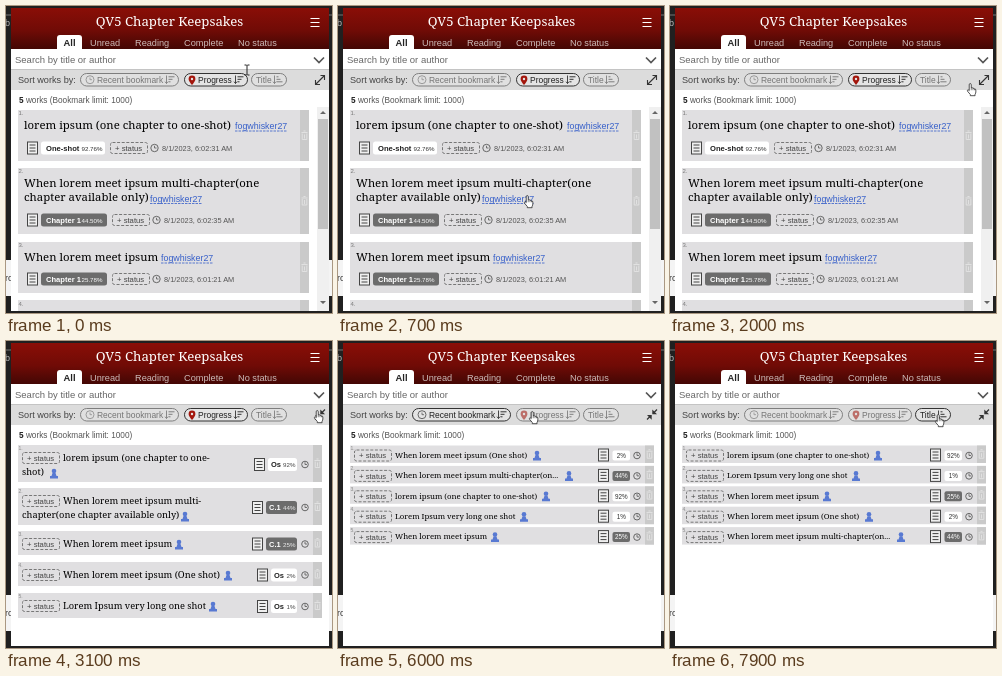
An HTML page that plays this animation: 326 by 307 pixels, repeating every 8 s.

```html
<!DOCTYPE html>
<html lang="en">
<head>
<meta charset="utf-8">
<title>Bookmark list</title>
<style>
  html, body { margin: 0; width: 100%; height: 100%; overflow: hidden; background: #222; }
  svg { display: block; width: 326px; height: 307px; }
  text { font-family: "Liberation Sans", Arial, sans-serif; white-space: pre; }
  .serif { font-family: "Noto Serif", Georgia, serif; }
  .b { font-weight: bold; }
  .head { font-weight: 500; }
  .sort { opacity: .55; }
  .sort.on { opacity: 1; }
  .bg { fill: #e0dfe1; }
  .side { fill: #cacaca; }
  .shade { opacity: 0; }
  .over .bg { fill: #c6c5c7; }
  .over .side { fill: #b5b5b5; }
  .over .shade { opacity: .6; }
</style>
</head>
<body>
<svg id="stage" viewBox="0 0 326 307" xmlns="http://www.w3.org/2000/svg"></svg>
<script>
const LOOP = 8000, STEP = 100;

// ---- drawing helpers ----
const rect = (x, y, w, h, fill, more = '') =>
  `<rect x="${x}" y="${y}" width="${w}" height="${h}" fill="${fill}" ${more}/>`;
const text = (x, y, size, str, fill = '#222', cls = '', more = '') =>
  `<text x="${x}" y="${y}" font-size="${size}" fill="${fill}" class="${cls}" ${more}>${str}</text>`;
const line = (d, color, w = 1, more = '') =>
  `<path d="${d}" fill="none" stroke="${color}" stroke-width="${w}" ${more}/>`;
const group = (body, more = '') => `<g ${more}>${body}</g>`;

const doc = (x, cy) =>
  rect(x + .5, cy - 6, 10, 12, '#efefef', 'stroke="#444"') +
  line(`M${x + 2.5} ${cy - 3}h6m-6 3h6m-6 3h6`, '#444', 1);
const clock = (x, y, r = 3.7) =>
  `<circle cx="${x}" cy="${y}" r="${r}" fill="none" stroke="#666"/>` +
  line(`M${x} ${y - 2.2}V${y}h2`, '#666', .9);
const person = (x, y) =>
  `<path d="M${x - 4} ${y + 5.5}v-2.5h1.5l1-3h3l1 3h1.5v2.5z" fill="#5879d2"/>` +
  `<circle cx="${x}" cy="${y - 2}" r="2.3" fill="#5879d2"/>`;
const status = (x, cy) =>
  rect(x + .5, cy - 5.5, 37, 11, 'none', 'rx="2" stroke="#777" stroke-dasharray="3 1.6"') +
  text(x + 5, cy + 2.7, 7.7, '+ status', '#444');
const pill = (x, cy, w, gray) =>
  rect(x, cy - 6.5, w, 13, gray ? '#6c6c6c' : '#fff', 'rx="2.5"');
const trash = (x, y) =>
  line(`M${x - 3} ${y - 3}h6M${x - 1} ${y - 4.5}h2M${x - 2.3} ${y - 2}v6h4.6v-6M${x} ${y - 1}v4`, '#e4e4e4', .9);
const side = (x, y, h) => rect(x, y, 9, h, '#cacaca', 'class="side"') + trash(x + 4.5, y + h / 2);
const base = (w, y, h) => rect(12, y, w, h, '#e0dfe1', 'class="bg"') + side(3 + w, y, h);

// ---- data ----
const works = {
  A: { title: 'lorem ipsum (one chapter to one-shot)', tag: 'Os', pct: 92, end: 208 },
  B: { title: 'When lorem meet ipsum multi-chapter(on...', tag: 'C.1', pct: 44, end: 231, gray: true },
  C: { title: 'When lorem meet ipsum', tag: 'C.1', pct: 25, end: 157, gray: true },
  D: { title: 'When lorem meet ipsum (One shot)', tag: 'Os', pct: 2, end: 199 },
  E: { title: 'Lorem Ipsum very long one shot', tag: 'Os', pct: 1, end: 186 }
};
const orders = { progress: 'ABCDE', recent: 'DBAEC', title: 'AECDB' };

// y, height, title lines, link x, tag, percent, time of day
const cards = [
  [104, 51, ['lorem ipsum (one chapter to one-shot)'], 229, 'One-shot', '92.76%', '6:02:31'],
  [162, 66, ['When lorem meet ipsum multi-chapter(one', 'chapter available only)'], 144, 'Chapter 1', '44.50%', '6:02:35'],
  [236, 51, ['When lorem meet ipsum'], 155, 'Chapter 1', '25.78%', '6:01:21']
];

// y, height, title lines, icon x, icon y, work key
const midRows = [
  [104, 37, ['lorem ipsum (one chapter to one-', 'shot)'], 48, 132, 'A'],
  [147, 37, ['When lorem meet ipsum multi-', 'chapter(one chapter available only)'], 179, 175, 'B'],
  [190, 24, ['When lorem meet ipsum'], 173, 203, 'C'],
  [221, 24, ['When lorem meet ipsum (One shot)'], 222, 234, 'D'],
  [252, 25, ['Lorem Ipsum very long one shot'], 207, 265, 'E']
];

// ---- views ----
function card([y, h, lines, linkX, tag, pct, time], i) {
  const gray = i > 0, dx = gray ? 2 : 0, cy = y + h - (gray ? 14 : 13);
  const last = y + 19 + 14.5 * (lines.length - 1);
  return group(
    rect(12, y, 292.5, h + 1.5, '#666', 'class="shade"') + base(291, y, h) +
    text(12.5, y + 5, 6, `${i + 1}.`, '#777') +
    lines.map((s, n) => text(18, y + 18.5 + 14.5 * n, 11.37, s, '#000', 'serif')).join('') +
    text(linkX, last, 8.9, 'fogwhisker27', '#365fc9') +
    line(`M${linkX} ${last + 2}h52`, '#365fc9', .8, 'stroke-dasharray="2.5 1"') +
    doc(21, cy) + pill(35, cy, 64 + dx, gray) +
    text(40, cy + 2.8, 7.6, tag, gray ? '#fff' : '#222', 'b') +
    text(75.5, cy + 2.6, 6.2, pct, gray ? '#fff' : '#333') +
    status(104 + dx, cy) + clock(148.5 + dx, cy) +
    text(156 + dx, cy + 3, 7.4, `8/1/2023, ${time} AM`, '#555'),
    `class="card" data-top="${y}" data-end="${y + h}"`);
}

const fullView = cards.map(card).join('') +
  rect(12, 294, 291, 11, '#e0dfe1') + rect(294, 294, 9, 11, '#cacaca') +
  text(12.5, 300, 6, '4.', '#777') +
  rect(311, 101, 12, 204, '#f0f0f0') + rect(312, 113, 10, 110, '#c1c1c1') +
  '<path d="M314 108l3-3 3 3zM314 295l3 3 3-3z" fill="#666"/>';

const midView = midRows.map(([y, h, lines, px, py, key], i) => {
  const w = works[key], cy = y + h / 2 + 1, foot = y + 16;
  const left = w.gray ? 260 : w.pct > 9 ? 262 : 265;
  return base(304, y, h) +
    text(12.5, y + 5, 5, `${i + 1}.`, '#888') + status(16, foot - 3) +
    lines.map((s, n) => text(n ? 16 : 57, foot + 14 * n, 9.25, s, '#000', 'serif')).join('') +
    person(px, py) + doc(left - 14, cy) + pill(left, cy, 291 - left, w.gray) +
    text(left + 3, cy + 2.8, 7.5, w.tag, w.gray ? '#fff' : '#222', 'b') +
    text(289.5, cy + 2.5, 6.2, w.pct + '%', w.gray ? '#eee' : '#444', '', 'text-anchor="end"') +
    clock(299, cy, 3.3);
}).join('');

const tightView = order => [...order].map((key, i) => {
  const w = works[key], y = 104.5 + 20.4 * i, cy = y + 10;
  return base(304, y, 17.5) +
    text(12.5, y + 4.5, 5, `${i + 1}.`, '#888') + status(16, cy) +
    text(57, y + 12.3, 7.8, w.title, '#000', 'serif') + person(w.end, y + 9.5) +
    doc(260, cy - .5) + rect(274.5, cy - 5, 17.5, 10, w.gray ? '#6c6c6c' : '#fff', 'rx="2"') +
    text(283.3, cy + 2.3, 6.3, w.pct + '%', w.gray ? '#fff' : '#333', '', 'text-anchor="middle"') +
    clock(299, cy, 3.3);
}).join('');

const view = (name, body) => group(body, `data-view="${name}"`);

// ---- frame around the lists ----
const bars = (x, up) => [2, 4, 6].map((n, i) =>
  line(`M${x + 3.5} ${70.8 + 2.5 * i}h${up ? n : 8 - n}`, '#333', 1)).join('') +
  line(`M${x + 1.5} 69.5v8m-1.5-1.8l1.5 1.8 1.5-1.8`, '#333', .9);

const sortButton = (name, x, w, label, labelX, icon, up) => group(
  rect(x + .5, 67.5, w, 12.5, '#e4e4e4', 'rx="6.2" stroke="#333"') + icon +
  text(labelX, 76.8, 8.45, label) + bars(x + w - 13, up),
  `class="sort" data-sort="${name}"`);

const pin = '<path d="M186 79q-3.4-4-3.4-6a3.4 3.4 0 0 1 6.8 0q0 2-3.4 6z" fill="#a3160c"/>' +
  '<circle cx="186" cy="73" r="1.2" fill="#e4e4e4"/>';

const tabs = [[84, 'Unread'], [129, 'Reading'], [178, 'Complete'], [232, 'No status']];

const frame =
  rect(0, 0, 326, 307, '#202020') +
  rect(0, 8, 326, 2, '#4a4a4a') + text(-1, 20, 9, 'b', '#bbb') +
  rect(0, 254, 326, 36, '#f4f4f4') + text(-1, 275, 9, 'ro', '#333') +
  rect(5, 2, 318, 303, '#fff') +
  rect(5, 2, 318, 41, 'url(#head)') +
  text(163.5, 20, 13.2, 'QV5 Chapter Keepsakes', '#fff', 'serif head', 'text-anchor="middle"') +
  line('M304.5 12.5h9m-9 4h9m-9 4h9', '#fff', 1.2) +
  '<path d="M51 43V32q0-3 3-3h19q3 0 3 3v11z" fill="#fff"/>' +
  text(63.5, 40, 9.4, 'All', '#222', 'b', 'text-anchor="middle"') +
  tabs.map(([x, s]) => text(x, 40, 9.2, s, '#cdbab8')).join('') +
  text(9, 57, 9.5, 'Search by title or author', '#666') +
  line('M308 51.5l5 5 5-5', '#555', 1.7) +
  rect(5, 63, 318, 21, '#dcdcdc') + rect(5, 63, 318, 1, '#c4c4c4') +
  text(12, 77, 9.15, 'Sort works by:', '#444') +
  sortButton('recent', 74, 98, 'Recent bookmark', 91, clock(84, 73.7, 4)) +
  sortButton('progress', 178, 63, 'Progress', 192, pin) +
  sortButton('title', 245, 35, 'Title', 250, '', true) +
  text(13, 97, 8.25, '<tspan class="b" fill="#222">5</tspan> works (Bookmark limit: 1000)', '#555');

const expandIcon = line('M310 78l8-8M314.5 69.5h4V74M309.5 74v4.5h4.5', '#333', 1.1);
const shrinkIcon = line('M309 78.5l4-4M315 72.5l4-4', '#333', 1.2) +
  '<path d="M309 74h4.7v4.7zM314.3 68.5v4.7h4.7z" fill="#333"/>';

// ---- pointers, each with its tip at 0,0 ----
const pointers = {
  beam: line('M-2.5-5h2l.5.5.5-.5h2M0-4.5v9M-2.5 5h2l.5-.5.5.5h2', '#222'),
  arrow: '<path d="M0 0v8.5l2-1.8 1.4 3 1.4-.7-1.4-2.8h2.6z" fill="#fff" stroke="#444" stroke-width=".8"/>',
  hand: group('<path d="M-1 1Q-1-.6.3-.6T1.6 1V5l1-.3q1 0 1.2.9 1.4-.5 2 .7 1.6-.2 1.7 1.4v2.5q0 1.5-1 3V15H.4v-1.5L-3.2 9.2q-.7-1.3.5-1.7.8-.1 1.7 1z" fill="#fff" stroke="#222"/>' +
    line('M1.6 5v3M3.8 5.6v2.4M5.8 6.3V8', '#222', .7), 'transform="scale(.78)"')
};

const stage = document.getElementById('stage');
stage.innerHTML =
  '<defs><linearGradient id="head" x1="0" y1="0" x2="0" y2="1">' +
  '<stop offset="0" stop-color="#8a0e07"/><stop offset=".55" stop-color="#700b06"/>' +
  '<stop offset="1" stop-color="#430704"/></linearGradient></defs>' +
  frame + view('full', fullView + expandIcon) + view('mid', midView + shrinkIcon) +
  Object.keys(orders).map(k => view(k, tightView(orders[k]) + shrinkIcon)).join('') +
  rect(5, 305, 318, 2, '#202020') +
  Object.entries(pointers).map(([k, body]) => group(body, `data-pointer="${k}"`)).join('');

// ---- motion ----
// time, x, y of the pointer tip
const path = [
  [0, 241, 64], [100, 241, 64], [300, 228, 88], [500, 205, 140], [600, 196, 159],
  [700, 189, 190], [800, 190, 198], [1000, 203, 262], [1200, 207, 195], [1300, 207, 160],
  [1600, 235, 115], [2000, 300, 78], [2300, 311, 70], [3600, 311, 70], [4100, 245, 83],
  [4400, 210, 80], [4600, 208, 77], [5000, 130, 72], [5500, 130, 72], [5900, 194, 71],
  [6400, 194, 71], [6900, 268, 74], [8000, 268, 74]
];
// time, list shown, active sort
const states = [
  [0, 'full', 'progress'], [2500, 'mid', 'progress'], [3300, 'progress', 'progress'],
  [5100, 'recent', 'recent'], [6200, 'progress', 'progress'], [7000, 'title', 'title']
];

function tipAt(t) {
  const i = Math.max(1, path.findIndex(p => p[0] >= t));
  const [t0, x0, y0] = path[i - 1], [t1, x1, y1] = path[i];
  const k = (t - t0) / (t1 - t0);
  return [x0 + (x1 - x0) * k, y0 + (y1 - y0) * k];
}

const views = stage.querySelectorAll('[data-view]');
const sorts = stage.querySelectorAll('.sort');
const cardEls = stage.querySelectorAll('.card');
const pointerEls = stage.querySelectorAll('[data-pointer]');
const show = (el, on) => { el.style.display = on ? '' : 'none'; };

function draw(t) {
  const [, name, active] = states.filter(s => s[0] <= t).pop();
  const [x, y] = tipAt(t);
  const lagY = tipAt(Math.max(0, t - STEP))[1];
  const betweenBars = y > 79 && y < 103;
  const kind = t < 2 * STEP ? 'beam' : betweenBars ? 'arrow' : 'hand';
  views.forEach(v => show(v, v.dataset.view === name));
  sorts.forEach(s => s.classList.toggle('on', s.dataset.sort === active));
  // hover shading trails the pointer by one step
  cardEls.forEach(c => c.classList.toggle('over', lagY > +c.dataset.top && lagY < +c.dataset.end));
  pointerEls.forEach(p => {
    show(p, p.dataset.pointer === kind);
    p.setAttribute('transform', `translate(${x.toFixed(1)} ${y.toFixed(1)})`);
  });
}

const start = performance.now();
function tick() {
  const t = (performance.now() - start) % LOOP;
  draw(Math.floor(t / STEP) * STEP);
  requestAnimationFrame(tick);
}
tick();
</script>
</body>
</html>
```
